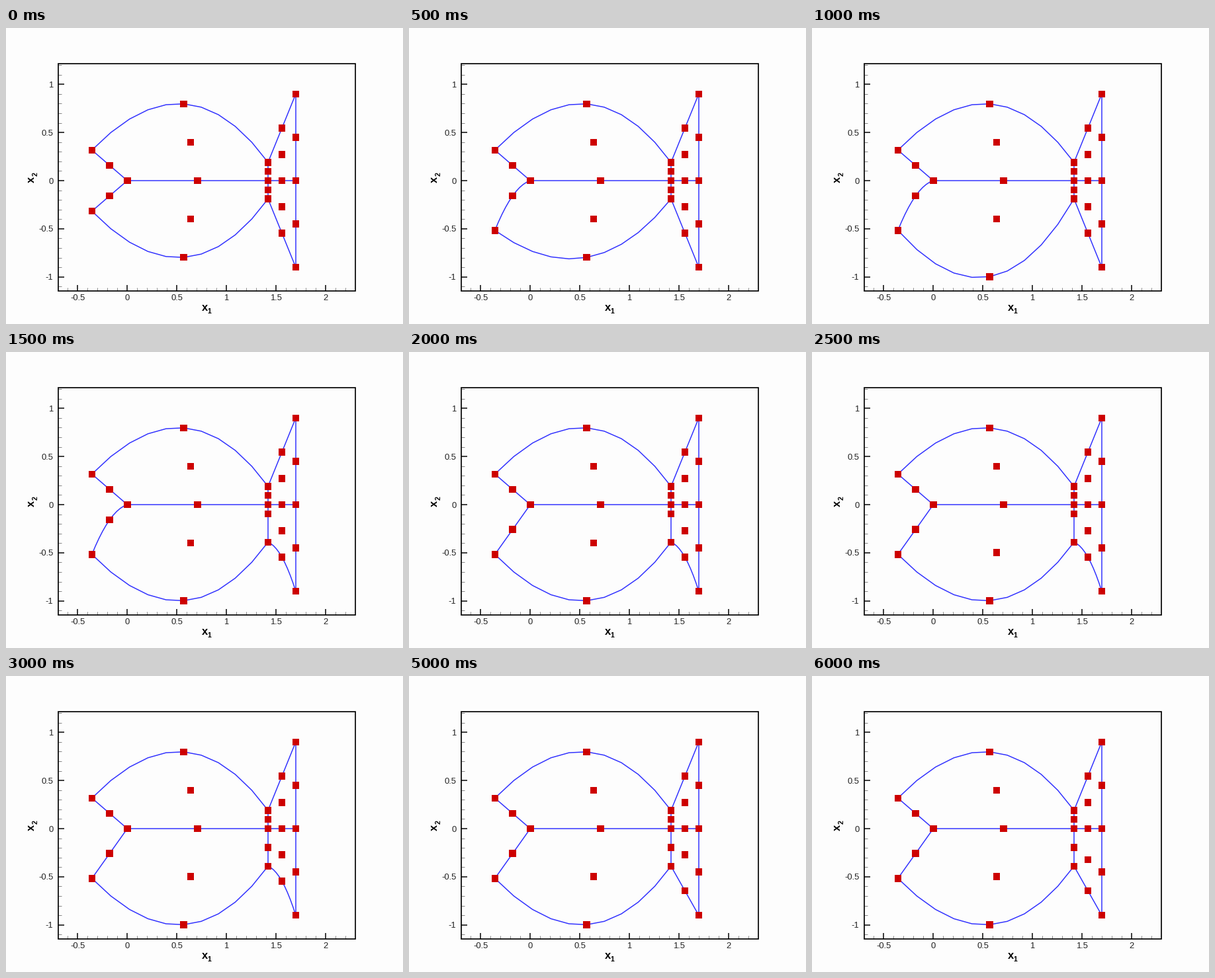
A matplotlib script for the animation above (8000 ms loop, 600x448 px).

```python
import numpy as np
import matplotlib.pyplot as plt
from matplotlib.animation import FuncAnimation
from matplotlib.patches import Rectangle

W, H, DPI = 600, 448, 100
PX = 72 / DPI                     # one pixel in points
BLUE, RED, BG = "#3030ff", "#cd0000", "#fdfdfd"
LEFT, RIGHT, TOP, BOTTOM = 78.5, 527.5, 54.3, 398
SIDE = 10.5
STEP = 500                        # ms per frame

# Upper control points; the lower half mirrors them.
HALF = {
    "lip": (-0.357, 0.317),
    "lip_mid": (-0.178, 0.158),
    "belly": (0.57, 0.797),
    "body": (0.64, 0.398),
    "root": (1.42, 0.19),
    "root_mid": (1.42, 0.095),
    "fin_mid": (1.56, 0.545),
    "fin": (1.56, 0.2725),
    "tip": (1.70, 0.9),
    "tip_mid": (1.70, 0.45),
}
AXIS = {
    "nose": (0, 0),
    "spine": (0.71, 0),
    "joint": (1.42, 0),
    "tail": (1.56, 0),
    "end": (1.70, 0),
}
EDGES = [
    ("nose", "lip_mid", "lip"),
    ("lip", "belly", "root"),
    ("joint", "root_mid", "root"),
    ("root", "fin_mid", "tip"),
    ("end", "tip_mid", "tip"),
]
# (time in ms, lower point, downward shift)
MOVES = [
    (500, "lip", 0.2),
    (1000, "belly", 0.2),
    (1500, "root", 0.2),
    (2000, "lip_mid", 0.1),
    (2500, "body", 0.1),
    (3000, "root_mid", 0.1),
    (5000, "fin_mid", 0.1),
    (6000, "fin", 0.05),
]


def to_px(x, y):
    return 183.3 + 149.8 * x, 231 - 145.8 * y


def lower_half(ms):
    pts = {k: (x, -y) for k, (x, y) in HALF.items()}
    for start, key, drop in MOVES:
        if ms >= start:
            x, y = pts[key]
            pts[key] = (x, y - drop)
    return pts


def quad(a, b, c):
    """Quadratic through three points, in ten straight pieces."""
    t = np.linspace(0, 1, 11)[:, None]
    p = (2 * (t - 0.5) * (t - 1) * np.array(a) + 4 * t * (1 - t) * np.array(b)
         + 2 * t * (t - 0.5) * np.array(c))
    return to_px(p[:, 0], p[:, 1])


fig = plt.figure(figsize=(W / DPI, H / DPI), dpi=DPI, facecolor=BG)
ax = fig.add_axes([0, 0, 1, 1])
ax.set_xlim(0, W)
ax.set_ylim(H, 0)
ax.axis("off")


def line(xs, ys, width, color, z=1):
    return ax.plot(xs, ys, color=color, lw=width * PX, zorder=z,
                   solid_capstyle="butt", solid_joinstyle="round")[0]


def label(x, y, text, size, **kw):
    ax.text(x, y, text, fontsize=size * PX, family="Liberation Sans",
            va="baseline", rotation_mode="anchor", **kw)


def draw_axes():
    ax.add_patch(Rectangle((LEFT, TOP), RIGHT - LEFT, BOTTOM - TOP,
                           fill=False, ec="black", lw=1.7 * PX, zorder=5))
    for i in range(-6, 23):
        x = to_px(i / 10, 0)[0]
        major = i % 5 == 0
        size, width, color = (9, 1.5, "black") if major else (5, 0.7, "#555555")
        line([x, x], [BOTTOM, BOTTOM - size], width, color)
        if major:
            label(x, 412, f"{i / 10:g}", 13, ha="center", color="#222222")
    for i in range(-11, 13):
        y = to_px(0, i / 10)[1]
        major = i % 5 == 0
        size, width, color = (9, 1.5, "black") if major else (5, 0.7, "#555555")
        line([LEFT, LEFT + size], [y, y], width, color)
        if major:
            label(71.5, y + 4.5, f"{i / 10:g}", 13, ha="right", color="#222222")
    label(295.5, 428, "x", 16.5, weight="bold")
    label(304.5, 432, "1", 10.5, weight="bold")
    label(43, 233.5, "x", 16.5, weight="bold", rotation=90)
    label(47.5, 224.5, "2", 10.5, weight="bold", rotation=90)


def square():
    return ax.add_patch(Rectangle((0, 0), SIDE, SIDE, fc=RED, ec="none", zorder=4))


def place(box, point):
    x, y = to_px(*point)
    box.set_xy((x - SIDE / 2, y - SIDE / 2))


def shape(lines, boxes, pts):
    nodes = {**AXIS, **pts}
    for ln, keys in zip(lines, EDGES):
        ln.set_data(*quad(*(nodes[k] for k in keys)))
    for key, box in boxes.items():
        place(box, pts[key])


def new_half():
    return [line([], [], 1.5, BLUE, 3) for _ in EDGES], {k: square() for k in HALF}


draw_axes()
spine_x, spine_y = to_px(np.array([0, 1.70]), np.zeros(2))
line(spine_x, spine_y, 1.5, BLUE, 3)
for point in AXIS.values():
    place(square(), point)
shape(*new_half(), HALF)
lower = new_half()


def update(i):
    shape(*lower, lower_half(i * STEP))
    return [*lower[0], *lower[1].values()]


anim = FuncAnimation(fig, update, frames=16, interval=STEP,
                     init_func=lambda: update(0), repeat=True, repeat_delay=0)
plt.show()
```
